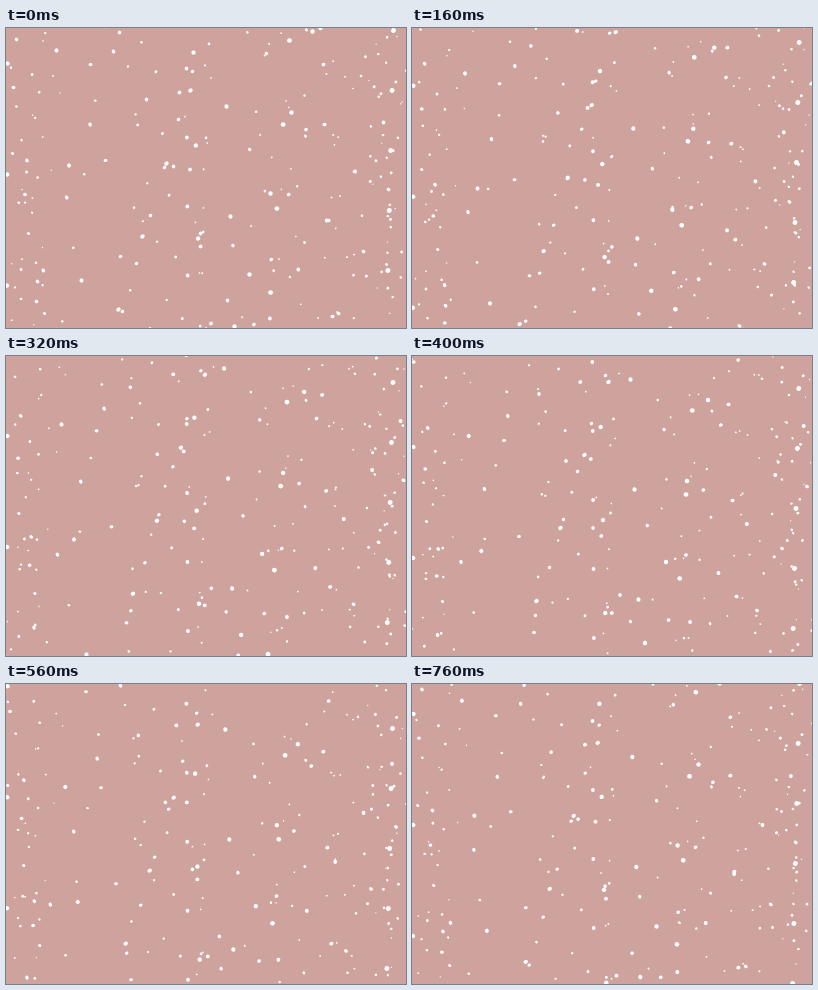
An HTML page with a canvas that plays this animation: 400x300 px, repeating every 0.8 s.

```html
<!DOCTYPE html>
<html lang="en">
<head>
<meta charset="utf-8">
<title>Snowfall</title>
<style>
  html, body { margin: 0; width: 100%; height: 100%; overflow: hidden; background: #cfa39d; }
  canvas { display: block; }
</style>
</head>
<body>
<canvas id="stage" width="400" height="300"></canvas>
<script>
const W = 400, H = 300, LOOP = 800, STEP = 40;
const ctx = document.getElementById('stage').getContext('2d');

let seed = 41;
function rand(min = 0, max = 1) {
  seed = (seed * 16807) % 2147483647;
  return min + (max - min) * seed / 2147483647;
}

// Each trail is a line of flakes; in one loop every flake reaches the next one's place.
// x, y, drift per loop, fall per loop, radius
const trails = [
  [283, 12, -6.3, 84, 2.4],
  [10, 11, 10.5, 121, 2],
  [387, 2, -1.4, 60, 2.4],
  [306, 3, -21, 81, 2.2],
  [220, 78, 4, 110, 2.1],
  [184, 62, -24, 73, 2.3],
  [187, 24, 2.3, 93, 2.2],
  [50, 22, 12.5, 115, 2.1],
  [7, 59, 11.5, 107, 1.9],
  [1, 35, -0.3, 111, 2.2],
  [107, 23, -23.4, 73, 2.1],
  [113, 4, 27, 67, 1.8],
  [377, 94, -28.4, 49, 2.1],
  [260, 25, -16.8, 96, 1.8],
  [180, 40, 0.4, 69, 2],
  [317, 36, -17.4, 65, 1.9],
  [318, 96, 4, 96, 2.1],
  [382, 161, -25, 62, 2],
  [6, 125, 16, 80, 1.7],
  [84, 36, 15, 96, 1.9],
  [173, 64, 10.5, 77, 2],
  [172, 91, -14, 48, 1.8]
];

// Finer snow, gathered in loose vertical bands
const bands = [[8, 92], [112, 205], [245, 330], [325, 398], [366, 397]];
for (let i = 0; i < 41; i++) {
  const [left, right] = bands[i % bands.length];
  const drift = rand(-11, 11), fall = rand(50, 110);
  const y = rand(0, fall);
  const x = rand(left, right) - drift * 1.2;
  trails.push([x, y, drift, fall, rand(0.7, 1.55)]);
}

const snow = trails.map(([x, y, drift, fall, r]) => ({
  x, y, drift, fall, r, flat: rand(0.8, 1), turn: rand(0, Math.PI)
}));

function draw(ms) {
  const p = Math.floor(ms % LOOP / STEP) * STEP / LOOP;
  ctx.fillStyle = '#cfa39d';
  ctx.fillRect(0, 0, W, H);
  ctx.fillStyle = '#fff';
  for (const s of snow) {
    for (let k = Math.floor((-4 - s.y) / s.fall); ; k++) {
      const y = s.y + (k + p) * s.fall;
      if (y > H + 4) break;
      const x = s.x + (k + p) * s.drift;
      ctx.beginPath();
      ctx.ellipse(x + 0.5, y + 0.5, s.r, s.r * s.flat, s.turn, 0, 2 * Math.PI);
      ctx.fill();
    }
  }
}

function tick() {
  draw(performance.now());
  requestAnimationFrame(tick);
}
tick();
</script>
</body>
</html>
```
